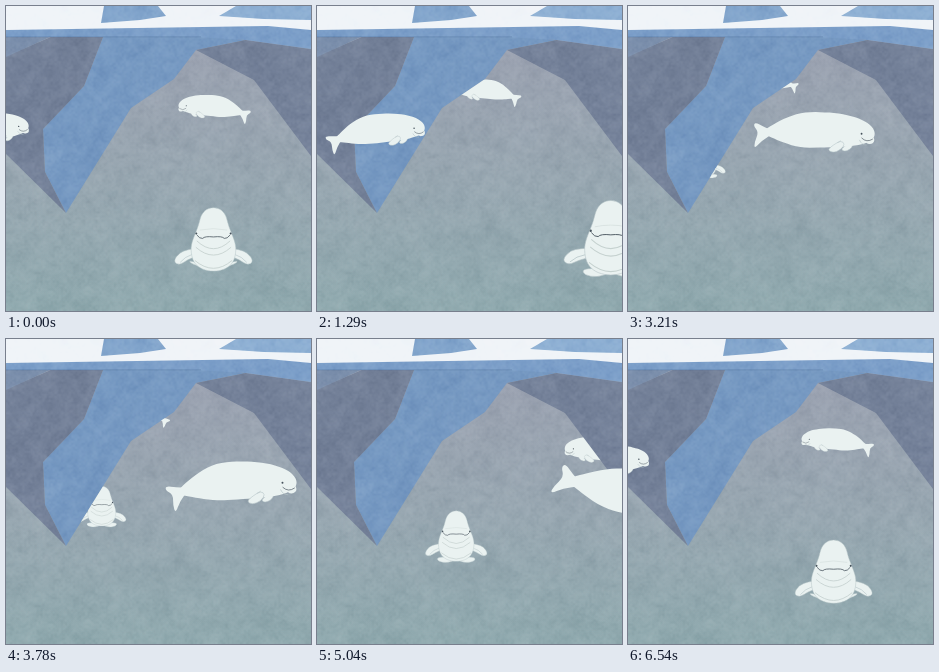
An HTML page with a canvas that plays this animation: 305 px wide and 305 px high, repeating every 6570 ms.

```html
<!DOCTYPE html>
<html lang="en">
<head>
<meta charset="utf-8">
<title>Belugas</title>
<style>
html, body { margin: 0; width: 100%; height: 100%; overflow: hidden; background: #97a6b0; }
canvas { display: block; width: 305px; height: 305px; }
</style>
</head>
<body>
<canvas id="stage" width="305" height="305"></canvas>
<script>
const SIZE = 305, LOOP = 6570, STEP = 30;
const ctx = document.getElementById('stage').getContext('2d');
const SKIN = '#eaf2f1', SHADE = '#b4c3c6', INK = '#46525c';

// Shared edges of the icebergs
const TIP = [60, 207], PEAK = [190, 44], CREST = [240, 34];
const RIDGE = [TIP, [125, 102], [168, 73], PEAK];
const CLEFT = [[97, 31], [78, 80], [37, 123], [39, 166], TIP];
const SLOPE = [PEAK, [248, 74], [SIZE, 150]];
const WATER = [[0, 148], ...RIDGE, ...SLOPE, [SIZE, SIZE], [0, SIZE]];

const ease = p => {
  p = Math.min(1, Math.max(0, p));
  return p * p * (3 - 2 * p);
};
// Loop time counted from a whale's first appearance, which may be negative
const since = (start, time) => ((time - start) % LOOP + LOOP) % LOOP + start;
// Two tail beats per loop
const beat = t => Math.cos((t - 2370) / LOOP * 4 * Math.PI);

function cruiser(time) {
  const t = since(-370, time), u = t / LOOP, b = beat(t);
  return {
    x: -24 + .062 * t + 1e-6 * t * t,
    y: 121 + 33 * ease((t - 2900) / 1700) - 4 * b,
    scale: .78 + .62 * Math.max(0, t / 5700) ** 1.6,
    tilt: -5 + 12 * u + 4 * b,
    bend: 2 - 12 * u - 9 * b
  };
}

function distant(time) {
  const t = since(-1770, time);
  const x = 120 + 89 * Math.exp(-t / 2400);
  return {
    x,
    y: 73 + 37 * ease((x - 130) / 120),
    scale: .61 - 45e-6 * t,
    tilt: 4,
    bend: 2 - 8 * beat(t)
  };
}

function facing(time) {
  const t = since(-3870, time), rise = ease(t / 3600);
  return {
    x: 192 + .0345 * t + 82 * ease((t + 1000) / 3600),
    y: 228 + .023 * t - 110 * rise,
    scale: .98 + 131e-6 * t,
    tilt: 0,
    tail: 1 - Math.exp(-((t / 500) ** 2)),
    lift: .5 * rise
  };
}

function poly(g, points) {
  g.beginPath();
  points.forEach(p => g.lineTo(...p));
  g.closePath();
}

// Walk down one side of a body and back up the other.
function outline(point, steps = 36) {
  return Array.from({ length: steps }, (_, i) => {
    const a = (i + .5) / steps * 2 * Math.PI;
    return point((1 - Math.cos(a)) / 2, Math.sign(Math.sin(a)));
  });
}

// Closed soft shape: curves run between the midpoints.
function blob(points, line = SHADE, fill = SKIN) {
  const mid = (p, q) => [(p[0] + q[0]) / 2, (p[1] + q[1]) / 2];
  ctx.beginPath();
  points.forEach((p, i) => ctx.quadraticCurveTo(...p, ...mid(p, points[(i + 1) % points.length])));
  ctx.quadraticCurveTo(...points[0], ...mid(points[0], points[1]));
  ctx.fillStyle = fill;
  ctx.fill();
  if (line) {
    ctx.strokeStyle = line;
    ctx.lineWidth = .5;
    ctx.stroke();
  }
}

function oval(x, y, rx, ry, color) {
  ctx.beginPath();
  ctx.ellipse(x, y, rx, ry, 0, 0, 7);
  ctx.fillStyle = color;
  ctx.fill();
}

function curve(from, control, to, color = SHADE, width = .6) {
  ctx.beginPath();
  ctx.moveTo(...from);
  ctx.quadraticCurveTo(...control, ...to);
  ctx.strokeStyle = color;
  ctx.lineWidth = width;
  ctx.stroke();
}

function place(pose, flip, draw) {
  ctx.save();
  ctx.translate(pose.x, pose.y);
  ctx.rotate(pose.tilt * Math.PI / 180);
  ctx.scale(flip * pose.scale, pose.scale);
  draw(pose);
  ctx.restore();
}

function sideWhale({ bend }) {
  const sag = x => bend * (Math.max(0, -x) / 50) ** 2;
  ctx.save();
  ctx.translate(-45, 5 + sag(-45));
  ctx.rotate(-bend * .05);
  blob([[5, -2], [-4, -4], [-13, -7], [-14, -3], [-8, 2], [-10, 12], [-9, 19], [-3, 9], [5, 2]], null);
  ctx.restore();

  const flipper = [[6, -7], [-1, -3], [-7, 2], [-2, 5], [6, 2], [10, -4]];
  const fin = (x, y, size) => blob(flipper.map(p => [x + p[0] * size, y + p[1] * size]));
  fin(32, 17, .7);
  blob(outline((u, side) => {
    const x = -48 + 108 * u;
    const girth = (2 + 15.5 * Math.sin(Math.min(1, u / .42) * Math.PI / 2)) * Math.sqrt(1 - u ** 5);
    return [x, -1 + 7 * (1 - u) ** 4 + 4 * u ** 4 + side * girth + sag(x)];
  }), null);
  oval(55, 9, 4.5, 4, SKIN);
  fin(21, 17, 1);
  curve([58, 8], [52, 12], [47, 7], INK);
  curve([45, 9], [47, 14], [52, 14]);
  oval(47, 3, .9, .9, INK);
}

function frontWhale({ tail, lift }) {
  for (const side of [-1, 1]) {
    ctx.save();
    ctx.scale(side, 1);
    blob([[0, 32], [14, 30 + 2 * tail], [25, 27 + 6 * tail], [23, 30 + 8 * tail], [12, 34 + 6 * tail], [0, 36]]);
    ctx.translate(18, 17);
    ctx.rotate(-lift);
    blob([[-3, -3], [8, -1], [17, 2], [23, 11], [17, 15], [8, 9], [0, 6]]);
    curve([4, 4], [11, 6], [16, 12]);
    ctx.restore();
  }
  blob(outline((v, side) => {
    const width = (15 + 8 * ease((v - .2) / .45)) * Math.sqrt(1 - Math.abs(2 * v - 1) ** 4);
    return [side * width, -27 + 65 * v];
  }));
  // Throat folds, from the chin down
  for (let i = 0; i < 3; i++) {
    const y = 7 + i * (3 + 3.5 * i);
    curve([-17 - i, y], [0, y + 16], [17 + i, y], '#c6d2d0', .9);
  }
  curve([-14, -4], [0, -7], [14, -4], '#d2dddb');
  for (const side of [-1, 1]) {
    curve([0, 3], [side * 9, 2], [side * 11, 4.5], INK, .8);
    curve([side * 11, 4.5], [side * 14, 5], [side * 17, 1], INK, .8);
    oval(side * 17.5, -.5, 1, 1.1, INK);
  }
}

// Stretch random grey grids over the scene for a mottled paper look.
function paper(g) {
  let seed = 4271;
  const rand = () => (seed = seed * 16807 % 2147483647) / 2147483647;
  for (const cells of [24, 60, 150]) {
    const grid = document.createElement('canvas');
    grid.width = grid.height = cells;
    const gg = grid.getContext('2d');
    for (let i = 0; i < cells * cells; i++) {
      const v = Math.round(127 * (rand() + rand()));
      gg.fillStyle = `rgb(${v},${v},${v})`;
      gg.fillRect(i % cells, Math.floor(i / cells), 1, 1);
    }
    g.globalCompositeOperation = 'soft-light';
    g.globalAlpha = .11;
    g.imageSmoothingQuality = 'high';
    g.drawImage(grid, 0, 0, SIZE, SIZE);
  }
}

function paintScene() {
  const canvas = document.createElement('canvas');
  canvas.width = canvas.height = SIZE;
  const g = canvas.getContext('2d');
  const sea = g.createLinearGradient(0, 40, 0, SIZE);
  sea.addColorStop(0, '#9ba2b1');
  sea.addColorStop(.5, '#98a7b1');
  sea.addColorStop(1, '#8fa9ae');
  const fill = (color, points) => {
    poly(g, points);
    g.fillStyle = color;
    g.fill();
  };
  fill(sea, [[0, 0], [SIZE, 0], [SIZE, SIZE], [0, SIZE]]);
  fill('#7699c2', [...CLEFT, ...RIDGE, CREST, [200, 30]]);
  fill('#748199', [[0, 50], [45, 31], ...CLEFT, [0, 148]]);
  fill('#7b8fac', [[0, 30], [46, 30], [0, 51]]);
  fill('#75829a', [CREST, ...SLOPE, [SIZE, 43]]);
  fill('#7c9fc9', [[0, 22], [SIZE, 18], [SIZE, 43], CREST, [190, 31], [0, 31]]);
  fill('#f0f4f8', [[0, 0], [SIZE, 0], [SIZE, 24], [262, 20], [0, 24]]);
  fill('#82a5cc', [[98, 0], [152, 0], [160, 10], [134, 14], [95, 17]]);
  fill('#8dafd3', [[230, 0], [SIZE, 0], [SIZE, 14], [258, 13], [213, 10]]);
  fill('rgba(70,100,145,.45)', [[0, 30.5], [195, 30.5], [195, 31.3], [0, 31.3]]);
  paper(g);
  return canvas;
}

const scene = paintScene();

function frame() {
  const time = Math.floor(performance.now() % LOOP / STEP) * STEP;
  ctx.drawImage(scene, 0, 0);
  ctx.save();
  poly(ctx, WATER);
  ctx.clip();
  place(distant(time), -1, sideWhale);
  place(facing(time), 1, frontWhale);
  ctx.restore();
  place(cruiser(time), 1, sideWhale);
  requestAnimationFrame(frame);
}
frame();
</script>
</body>
</html>
```
